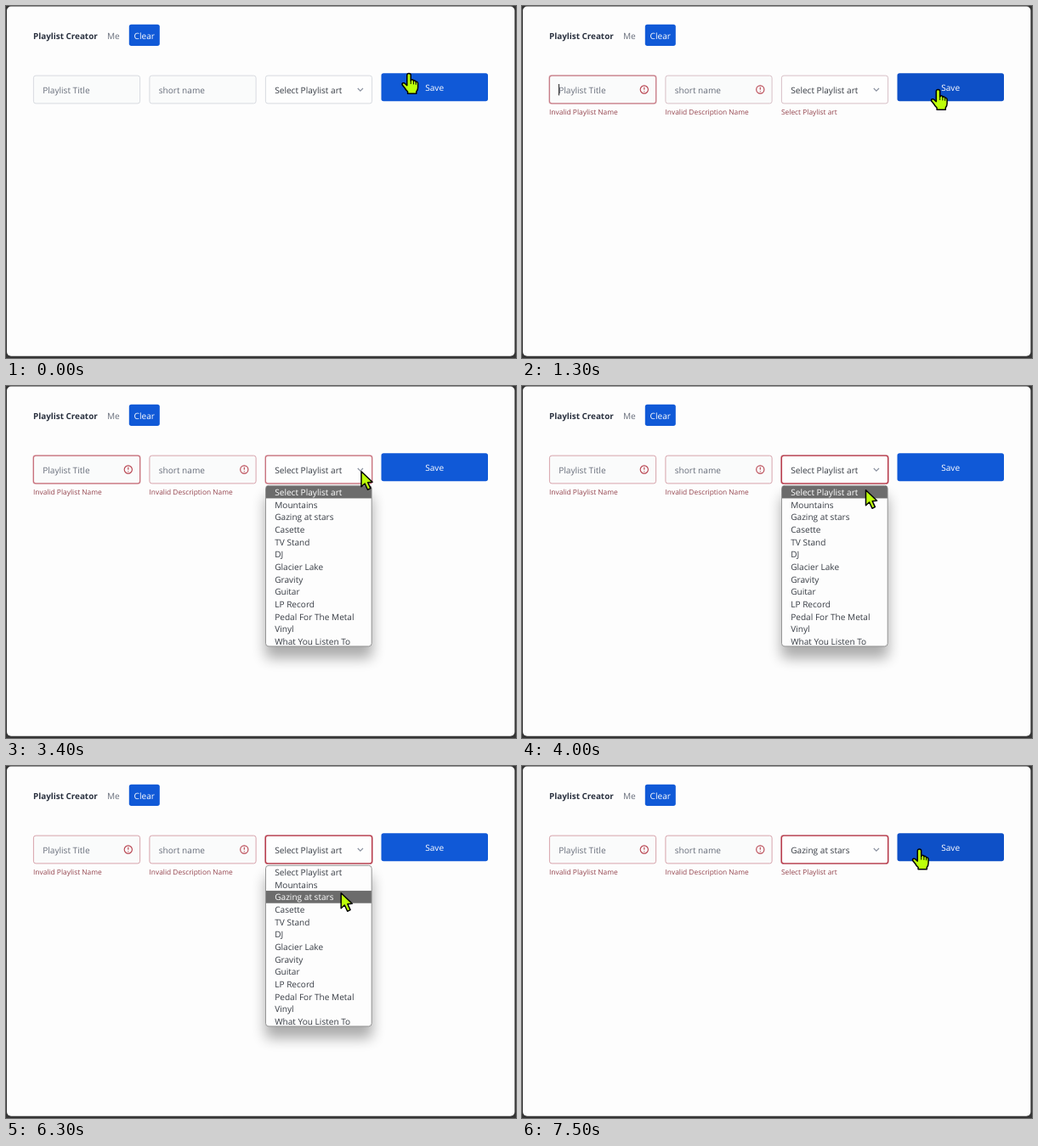
An HTML page that plays this animation: 600x415 px, repeating every 8 s.

```html
<!DOCTYPE html>
<html lang="en">
<head>
<meta charset="utf-8">
<title>Playlist Creator</title>
<style>
html, body { margin: 0; width: 100%; height: 100%; overflow: hidden; background: #353535; }
svg { display: block; width: 600px; height: 415px; }
text { font: 10.1px "Open Sans", "Noto Sans", sans-serif; fill: #373c44; text-rendering: geometricPrecision; white-space: pre; }
.title { font-size: 9.87px; font-weight: 700; fill: #2b3240; }
.muted { fill: #686e7b; }
.light { fill: #fff; }
.small { font-size: 8.4px; fill: #94434d; }
.cursor { stroke: #000; stroke-width: 1.5; stroke-linejoin: round; fill: #bdff0a; }
</style>
</head>
<body>
<svg id="stage" viewBox="0 0 600 415" xmlns="http://www.w3.org/2000/svg"></svg>
<script>
const LOOP = 8000, STEP = 100;
const ROW_TOP = 117.8, ROW_HEIGHT = 14.64;
const OPTIONS = ["Select Playlist art", "Mountains", "Gazing at stars", "Casette", "TV Stand", "DJ",
  "Glacier Lake", "Gravity", "Guitar", "LP Record", "Pedal For The Metal", "Vinyl", "What You Listen To"];
const FIELDS = [
  { x: 32, label: "Playlist Title", error: "Invalid Playlist Name" },
  { x: 168.5, label: "short name", error: "Invalid Description Name" },
  { x: 305, label: OPTIONS[0], error: "Select Playlist art", select: true }
];
const GREY = [216, 219, 224], PINK = [215, 163, 171], RED = [184, 58, 74];
const BLUE = [16, 89, 215], DARK_BLUE = [14, 80, 199];

// Pointer hot spot: time, x, y
const PATH = [
  [0, 474, 79], [100, 477, 83], [300, 486, 94], [600, 489.5, 98], [3100, 489.5, 98],
  [3200, 436, 104], [3300, 419, 100], [3400, 417.5, 100], [3900, 417.5, 100],
  [4000, 404, 122], [4200, 394.5, 137.5], [5500, 394.5, 137.5], [5600, 394, 139.5],
  [6000, 394, 140], [6100, 394, 140], [6200, 393.7, 146], [6300, 393.7, 149],
  [7200, 393.7, 149], [7300, 428, 126], [7400, 459, 102], [7500, 467.5, 97.5], [LOOP, 467.5, 97.5]
];

const stage = document.getElementById("stage");

function add(tag, attrs, parent = stage, content = "") {
  const node = document.createElementNS("http://www.w3.org/2000/svg", tag);
  for (const key in attrs) node.setAttribute(key, attrs[key]);
  node.textContent = content;
  parent.appendChild(node);
  return node;
}
const box = (x, y, width, height, rx, attrs, parent) =>
  add("rect", { x, y, width, height, rx, ...attrs }, parent);
const label = (x, y, content, cls = "", parent = stage) =>
  add("text", { x, y, class: cls }, parent, content);
const show = (node, on) => node.setAttribute("visibility", on ? "visible" : "hidden");
const ramp = (t, start, length = 200) => Math.min(1, Math.max(0, (t - start) / length));
const mix = (a, b, k) => a.map((v, i) => v + (b[i] - v) * k);
const rgb = c => `rgb(${c.map(Math.round)})`;

function buildField(field) {
  const { x, select } = field;
  field.ring = box(x - .3, 81.7, 126.4, 33.6, 3.2, { fill: "none", stroke: "#c98590", "stroke-width": 1.6 });
  field.frame = box(x + .4, 82.1, 125.2, 32.8, 2.7, { fill: select ? "#fefefe" : "#fafbfb" });
  field.text = label(x + 11.2, 102.8, field.label, select ? "" : "muted");
  if (select) {
    add("path", { d: "M413.8 97l3.1 3.1 3.1-3.1", fill: "none", stroke: "#8b92a0", "stroke-width": 1.2 });
  }
  field.alert = add("g", {});
  label(x, 128, field.error, "small", field.alert);
  if (!select) {
    add("path", {
      d: `M${x + 107.2} 98.5a4.6 4.6 0 1 0 9.2 0a4.6 4.6 0 1 0 -9.2 0M${x + 111.8} 95.8v3M${x + 111.8} 100.2v1`,
      fill: "none", stroke: "#b84450", "stroke-width": 1.15
    }, field.alert);
  }
}

function buildMenu() {
  const menu = add("g", {});
  box(305, 130, 126, 191, 5, { fill: "#000", opacity: .32, filter: "url(#soft)" }, menu);
  box(305.5, 117.3, 124.7, 189.6, 3.5, { fill: "#fdfdfd", stroke: "#8c8c8c", "stroke-width": .9 }, menu);
  const rows = add("g", { "clip-path": "url(#menuClip)" }, menu);
  const bar = box(305.5, ROW_TOP, 124.7, ROW_HEIGHT, 0, { fill: "#6c6c6c" }, rows);
  const items = OPTIONS.map((name, i) => label(316.2, 129.2 + i * ROW_HEIGHT, name, "", rows));
  return { menu, bar, items };
}

const defs = add("defs", {});
const soft = add("filter", { id: "soft", x: "-30%", y: "-30%", width: "160%", height: "160%" }, defs);
add("feGaussianBlur", { stdDeviation: 8 }, soft);
box(305.9, 117.6, 124, 189, 3, {}, add("clipPath", { id: "menuClip" }, defs));

box(0, 0, 600, 415, 0, { fill: "#353535" });
box(1, .6, 597.4, 412.2, 5, { fill: "#fdfdfd" });
label(32, 38.9, "Playlist Creator", "title");
label(119, 38.9, "Me", "muted");
box(144.8, 21.8, 36, 25.2, 2.7, { fill: rgb(BLUE) });
label(150.6, 38.9, "Clear", "light");
FIELDS.forEach(buildField);
const caret = box(42.9, 92, 1, 13.4, 0, { fill: "#222" });
const save = box(441.5, 79.2, 125.5, 33, 2.7, {});
label(493.2, 100.1, "Save", "light");
const { menu, bar, items } = buildMenu();
const arrow = add("path", {
  class: "cursor",
  d: "M.5 .8V18.8L4.6 15 8 22.2 11.4 20.6 8.2 13.8 13.6 13.2Z"
});
const hand = add("g", { class: "cursor" });
add("path", {
  d: "M-2.2 2.6Q-2.2 .6 0 .6T2.2 2.6V9Q2.6 7.6 4 7.8T5.4 9.6Q5.8 8.6 7 8.9T8.2 10.8Q8.8 9.9 9.7 10.5T10.6 12.6" +
     "V17Q10.6 20 8.8 22V24.2H-1.4V22Q-3.8 20-5 17.4L-7.8 14Q-8.4 12.4-6.8 11.8T-3.8 13.2L-2.2 14.6Z"
}, hand);
add("path", { d: "M2.2 9v4M5.4 10v3.4M8.2 11v2.8", fill: "none", "stroke-width": 1 }, hand);

function pointerAt(t) {
  const i = PATH.findIndex(p => p[0] > t);
  const [a, b] = [PATH[i - 1], PATH[i]];
  return mix(a, b, (t - a[0]) / (b[0] - a[0])).slice(1);
}

function render(time) {
  const t = Math.floor((time % LOOP) / STEP) * STEP;
  const invalid = ramp(t, 1200);
  const focus = [invalid * (1 - ramp(t, 3300)), 0, ramp(t, 3300)];
  FIELDS.forEach((field, i) => {
    field.frame.setAttribute("stroke", rgb(mix(mix(GREY, PINK, invalid), RED, focus[i])));
    field.frame.setAttribute("stroke-width", 1 + focus[i] * .3);
    field.ring.setAttribute("opacity", focus[i] * .6);
    show(field.alert, t >= 1200);
  });
  FIELDS[2].text.textContent = OPTIONS[t >= 6900 ? 2 : 0];
  show(caret, t >= 1200 && t < 3300 && !(t >= 2000 && t < 2300));

  const hover = t < 3200 ? ramp(t, 0) : t < 7000 ? 1 - ramp(t, 3100) : ramp(t, 7300);
  save.setAttribute("fill", rgb(mix(BLUE, DARK_BLUE, hover)));

  const active = t < 4100 ? 0 : t < 6200 ? 1 : 2;
  menu.setAttribute("display", t >= 3400 && t < 6900 ? "inline" : "none");
  bar.setAttribute("y", ROW_TOP + active * ROW_HEIGHT);
  items.forEach((item, i) => item.setAttribute("class", i === active ? "light" : ""));

  const onButton = t < 3200 || t >= 7400;
  const place = `translate(${pointerAt(t)})`;
  arrow.setAttribute("transform", place);
  hand.setAttribute("transform", place);
  show(hand, onButton);
  show(arrow, !onButton);
}

const start = performance.now();
function tick() {
  render(performance.now() - start);
  requestAnimationFrame(tick);
}
tick();
</script>
</body>
</html>
```
